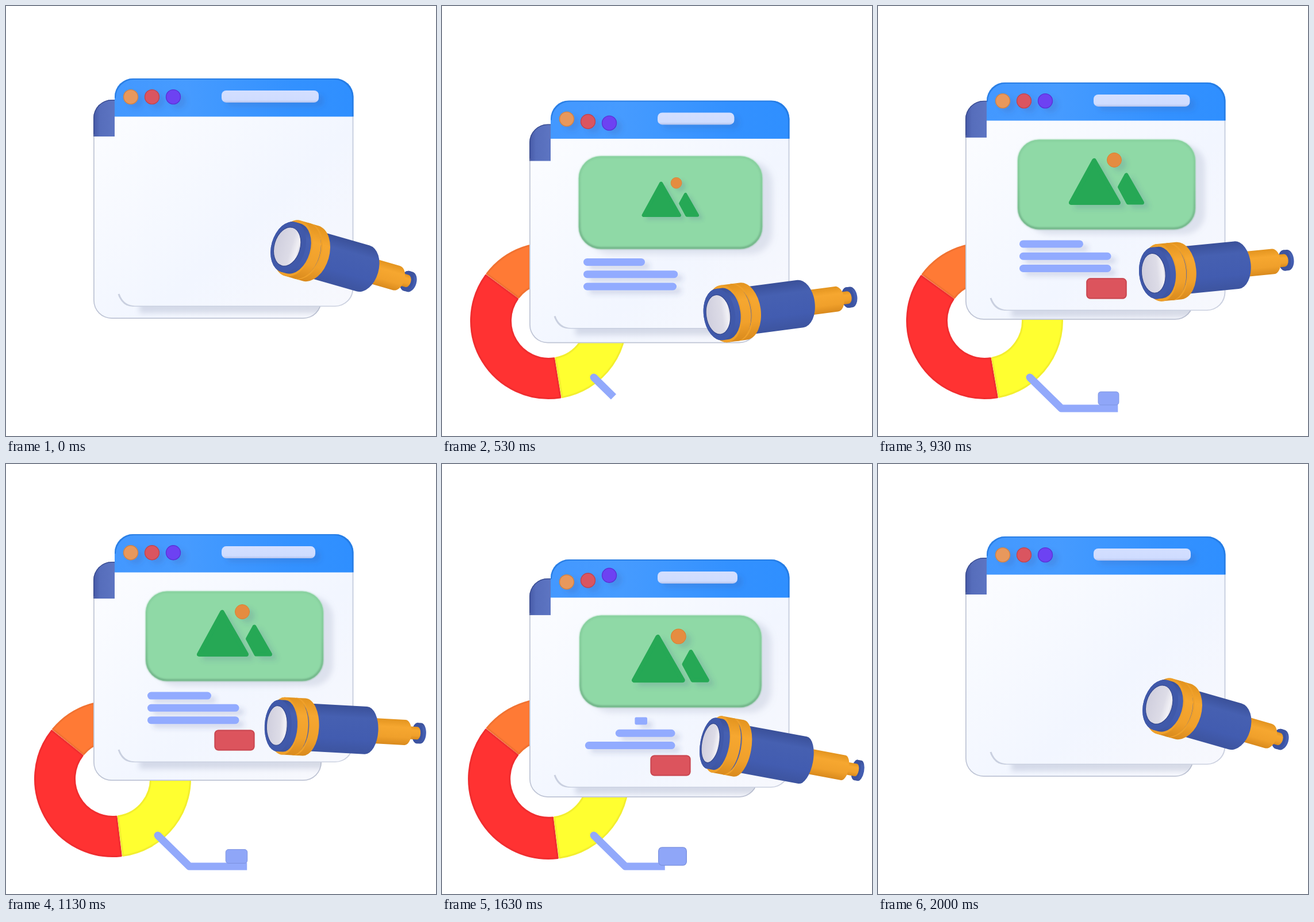
These frames come from a looping animation (748 px wide and 748 px high, 2030 ms). An HTML page:

```html
<!DOCTYPE html>
<html lang="en">
<head>
<meta charset="utf-8">
<title>Browser window and spyglass</title>
<style>
html, body { margin: 0; width: 100%; height: 100%; overflow: hidden; background: #fff; }
svg { display: block; width: 100vw; height: 100vh; }
</style>
</head>
<body>
<svg id="stage" viewBox="0 0 748 748" xmlns="http://www.w3.org/2000/svg">
  <defs>
    <linearGradient id="page" x1="0" y1="0" x2="1" y2="1">
      <stop offset="0" stop-color="#fcfdff"/><stop offset=".6" stop-color="#f2f6ff"/><stop offset="1" stop-color="#f7f8fd"/>
    </linearGradient>
    <linearGradient id="bar">
      <stop offset="0" stop-color="#4398ff"/><stop offset=".3" stop-color="#469bff"/><stop offset=".75" stop-color="#3391ff"/><stop offset="1" stop-color="#2f8fff"/>
    </linearGradient>
    <linearGradient id="backBar" x1="152" x2="190" gradientUnits="userSpaceOnUse">
      <stop offset="0" stop-color="#4659a6"/><stop offset=".3" stop-color="#566dbb"/><stop offset="1" stop-color="#5d75c2"/>
    </linearGradient>
    <linearGradient id="blue" x1="0" y1="0" x2="0" y2="1">
      <stop offset="0" stop-color="#3a5099"/><stop offset=".25" stop-color="#4660b1"/><stop offset=".7" stop-color="#425cb0"/><stop offset="1" stop-color="#3d549f"/>
    </linearGradient>
    <linearGradient id="gold" x1="0" y1="0" x2="0" y2="1">
      <stop offset="0" stop-color="#e3941f"/><stop offset=".3" stop-color="#f6a730"/><stop offset=".7" stop-color="#f0a02b"/><stop offset="1" stop-color="#d98a1d"/>
    </linearGradient>
    <linearGradient id="glass">
      <stop offset="0" stop-color="#cfcedd"/><stop offset=".65" stop-color="#dddce7"/><stop offset=".9" stop-color="#f2f1f6"/><stop offset="1" stop-color="#d5d4e0"/>
    </linearGradient>
    <linearGradient id="cardEdge" x1="0" y1="0" x2="0" y2="1">
      <stop offset="0" stop-color="#86cf9d"/><stop offset=".5" stop-color="#80c596"/><stop offset="1" stop-color="#6aa981"/>
    </linearGradient>
    <linearGradient id="pill" x1="0" y1="0" x2="0" y2="1">
      <stop offset="0" stop-color="#d3dfff"/><stop offset=".8" stop-color="#cfdcff"/><stop offset="1" stop-color="#b3c2ec"/>
    </linearGradient>
    <filter id="soft" x="-20%" y="-60%" width="140%" height="220%"><feGaussianBlur stdDeviation="5"/></filter>
    <filter id="bevel" x="-10%" y="-10%" width="120%" height="120%"><feGaussianBlur stdDeviation="1.5"/></filter>
    <filter id="bigShadow" x="-20%" y="-20%" width="150%" height="150%">
      <feDropShadow dx="17" dy="9" stdDeviation="5" flood-color="#7f88a8" flood-opacity=".2"/>
    </filter>
    <filter id="smallShadow" x="-40%" y="-60%" width="200%" height="300%">
      <feDropShadow dx="9" dy="7" stdDeviation="4" flood-color="#3d4f8f" flood-opacity=".16"/>
    </filter>
    <clipPath id="backClip"><rect x="152" width="397" height="381" rx="32"/></clipPath>
    <clipPath id="frontClip"><rect x="189" width="415.5" height="397" rx="32"/></clipPath>
  </defs>

  <g id="donut"></g>
  <g id="link" fill="#92a9fb">
    <path id="wire" d="M264 646L319 700H420" pathLength="1" fill="none" stroke="#92a9fb" stroke-width="13" stroke-linejoin="round"/>
    <circle cx="264" cy="646" r="6.5"/>
    <rect id="tag" x="-19.5" y="-12.5" width="39" height="25" rx="5" fill="#8fa6f8" stroke="#7c92df" stroke-width="1"/>
  </g>

  <g id="back">
    <g clip-path="url(#backClip)">
      <rect x="152" width="397" height="381" fill="url(#page)"/>
      <rect x="152" width="397" height="64" fill="url(#backBar)"/>
      <rect id="backShade" x="232" width="324" height="32" fill="#8e98b5" opacity=".3" filter="url(#soft)"/>
      <path d="M152 60V349a32 32 0 0 0 32 32H517a32 32 0 0 0 32-32" fill="none" stroke="#a9b0c4" stroke-width="3.5" opacity=".7"/>
      <path d="M152 64V32a32 32 0 0 1 32-32h10" fill="none" stroke="#364889" stroke-width="3" opacity=".8"/>
    </g>
  </g>

  <g id="front">
    <g clip-path="url(#frontClip)">
      <rect x="189" width="416" height="397" fill="url(#page)"/>
      <path d="M196 375Q203 396 224 397H572a32 32 0 0 0 32-32V66" fill="none" stroke="#b4bcd0" stroke-width="3" opacity=".65"/>
      <rect x="189" width="416" height="66.5" fill="url(#bar)"/>
      <path d="M189 34a34 34 0 0 1 34-34H570a34 34 0 0 1 34 34V66" fill="none" stroke="#2377dc" stroke-width="4" opacity=".75"/>
    </g>
    <g filter="url(#smallShadow)">
      <rect id="address" x="375" y="21" height="21" rx="8" fill="url(#pill)"/>
    </g>
    <g id="dots" filter="url(#smallShadow)"></g>
    <g id="card">
      <rect x="-154.5" y="-78" width="309" height="156" rx="37" fill="#8fd9a6" filter="url(#bigShadow)"/>
      <rect x="-153" y="-76.500" width="306" height="153" rx="35.500" fill="none" stroke="url(#cardEdge)" stroke-width="3" filter="url(#bevel)"/>
    </g>
    <g id="peaks" filter="url(#smallShadow)" fill="#25a855" stroke="#25a855" stroke-linejoin="round">
      <path d="M-21-34L-61 39H21Z" stroke-width="8"/>
      <path d="M35-9L23.500 12 38 39H62.500Z" stroke-width="7"/>
      <circle cx="14" cy="-35" r="12.500" fill="#e58c40" stroke="#d9812f" stroke-width="1"/>
    </g>
    <g id="lines" fill="#92abff" filter="url(#smallShadow)"></g>
    <g id="button">
      <rect x="-35" y="-18" width="70" height="36" rx="7" fill="#dc545d"/>
      <rect x="-34" y="-17" width="68" height="34" rx="6" fill="none" stroke="#c2434e" stroke-width="2" opacity=".7"/>
    </g>
  </g>

  <g id="scope"></g>
</svg>
<script>
const TAU = Math.PI * 2;
const LOOP = 2030, LENGTH = 2000, STEP = 100 / 3;
const $ = id => document.getElementById(id);
const clamp01 = v => Math.min(1, Math.max(0, v));
const place = (node, x, y, extra = '') => node.setAttribute('transform', `translate(${x} ${y}) ${extra}`);

function add(parent, name, attrs) {
  const node = document.createElementNS('http://www.w3.org/2000/svg', name);
  set(node, attrs);
  return parent.appendChild(node);
}
function set(node, attrs) {
  for (const key in attrs) node.setAttribute(key, attrs[key]);
}

// Monotone cubic curve through [time, value] pairs.
function track(t, keys) {
  const last = keys.length - 1;
  if (t <= keys[0][0]) return keys[0][1];
  if (t >= keys[last][0]) return keys[last][1];
  const slope = i => (keys[i + 1][1] - keys[i][1]) / (keys[i + 1][0] - keys[i][0]);
  const tangent = i => {
    if (i === 0 || i === last) return 0;
    const a = slope(i - 1), b = slope(i);
    return a * b > 0 ? 2 * a * b / (a + b) : 0;
  };
  let i = 0;
  while (t > keys[i + 1][0]) i++;
  const span = keys[i + 1][0] - keys[i][0], u = (t - keys[i][0]) / span;
  const ease = u * u * (3 - 2 * u);
  return keys[i][1] * (1 - ease) + keys[i + 1][1] * ease
    + span * u * (1 - u) * ((1 - u) * tangent(i) - u * tangent(i + 1));
}

// Scale that springs in at `start` and pulls back before vanishing at `end`.
function pop(t, start, end, duration = 350) {
  const u = t < end ? 1 - clamp01((t - start) / duration) : clamp01((t - end) / duration);
  return 1 - (3.1 * u ** 3 - 2.1 * u ** 2);
}

const wave = (t, mid, amp, delay = 0) => mid - amp * Math.cos(TAU * (t - delay) / 1000);

// Donut
function sector(from, to, inner, outer) {
  const at = (deg, r) => {
    const a = deg * TAU / 360;
    return `${(r * Math.sin(a)).toFixed(2)} ${(-r * Math.cos(a)).toFixed(2)}`;
  };
  return `M${at(from + .7, outer)}A${outer} ${outer} 0 0 1 ${at(to - .7, outer)}`
    + `L${at(to - 1.3, inner)}A${inner} ${inner} 0 0 0 ${at(from + 1.3, inner)}Z`;
}
[[0, 136, '#ff3232', '#f02d2f'], [136, 269, '#ff7a35', '#f17231'], [269, 360, '#ffff30', '#f3ef2e']]
  .forEach(([from, to, fill, stroke]) => add($('donut'), 'path',
    { d: sector(from, to, 66, 135), fill, stroke, 'stroke-width': 3, 'stroke-linejoin': 'round' }));

// Window controls and text lines
const dots = [['#e8985b', '#cf8247', 217], ['#da5560', '#c0444f', 254], ['#6d42f2', '#5a33d6', 291]]
  .map(([fill, stroke, cx]) => add($('dots'), 'circle', { cx, r: 12.5, fill, stroke, 'stroke-width': 1.4 }));
const lineLengths = [111, 159.5, 159.5];
const lines = lineLengths.map((_, i) => add($('lines'), 'rect', { y: 274.5 + i * 21.3, height: 13 }));

function hop(t, start) {
  const u = (t - start) / 333.3;
  return u > 0 && u < 1 ? -7.4 * Math.sin(TAU * u) : 0;
}
const lineGrow = [[0, 0], [8, .12], [41, .736], [75, 1.135], [135, .95], [208, 1.016], [241, 1.03], [275, .964], [400, 1]];

// Spyglass parts, far to near: axial start, end, radius, paint
const AXIS_MID = 144;
const tubes = [
  [280, 287, 18, 'url(#blue)', '#3c53a0'],
  [255, 280, 11, 'url(#gold)'],
  [175, 255, 22, 'url(#gold)'],
  [40, 175, 41.5, 'url(#blue)'],
  [31, 49, 50, 'url(#gold)', '#efa02a'],
  [24, 31, 46, 'url(#blue)'],
  [7, 27, 50, 'url(#gold)', '#efa02a'],
  [-4, 8, 45, 'url(#blue)', '#4059aa']
].map(([from, to, r, fill, cap]) => ({
  from, to, r,
  side: add($('scope'), 'path', { fill }),
  cap: cap && add($('scope'), 'ellipse', { fill: cap })
}));
const lens = add($('scope'), 'ellipse', { fill: 'url(#glass)', stroke: '#36498f', 'stroke-width': 1.2 });

function drawScope(t) {
  const tilt = track(t, [[0, 16], [333, 13], [533, -7.5], [933, -5.6], [1333, 10.9], [1633, 10.5], [2000, 16]]);
  const yaw = track(t, [[0, 41], [333, 41], [533, 37.5], [933, 37], [1333, 26], [1633, 26], [2000, 41]]) * TAU / 360;
  const along = Math.cos(yaw), k = Math.sin(yaw);
  const ax = v => (v - AXIS_MID) * along;
  place($('scope'), 598.5 + 10 * (along - .755), wave(t, 486, 36), `rotate(${tilt})`);
  for (const { from, to, r, side, cap } of tubes) {
    const a = ax(from), b = ax(to), arc = `A${k * r} ${r} 0 0 1 `;
    side.setAttribute('d', `M${a} ${-r}L${b} ${-r}${arc}${b} ${r}L${a} ${r}${arc}${a} ${-r}Z`);
    if (cap) set(cap, { cx: a, rx: k * r, ry: r });
  }
  set(lens, { cx: ax(-4) - 2, rx: k * 34.5, ry: 34.5 });
}

function draw(t) {
  const back = wave(t, 184.5, 21.5), front = wave(t, 144, 22.4, 101);
  place($('back'), 0, back);
  place($('front'), 0, front);
  $('backShade').setAttribute('y', front + 376 - back);

  const spin = track(t, [[17, 290], [333, 198], [533, 170.6], [933, 170], [1333, 176], [1633, 172.8], [1940, 90]]);
  place($('donut'), 185.5, 547.5, `rotate(${spin}) scale(${pop(t, 17, 1588)})`);

  const drawn = track(t, [[450, 0], [533, .27], [760, .95], [933, .985], [1333, 1], [1550, 1], [1633, .82], [1850, 0]]);
  $('wire').setAttribute('stroke-dasharray', `${drawn} 2`);
  $('link').setAttribute('visibility', drawn > 0 ? 'visible' : 'hidden');
  place($('tag'), 401, 682.5, `scale(${track(t, [[733, 0], [933, .92], [1333, 1], [1633, 1.25], [1850, 0]])})`);

  $('address').setAttribute('width', 151 + 18 * Math.cos(TAU * t / 1000));
  dots.forEach((dot, i) =>
    dot.setAttribute('cy', 32.2 + hop(t, 166.7 + i * 66.7) + hop(t, 1366.7 + i * 66.7)));

  place($('card'), 397.5, 177.5, `scale(${pop(t, 233, 1592)})`);
  place($('peaks'), 397, 170, `scale(${pop(t, 463, 1588)})`);
  place($('button'), 397.5, 358.5, `scale(${pop(t, 600, 1633)})`);

  lines.forEach((line, i) => {
    const grown = lineLengths[i] * track(t - 258 - i * 33.5, lineGrow);
    const width = grown * track(t - 1558 - i * 33.5, [[0, 1], [105, 0]]);
    set(line, { x: 246 + grown - width, width, rx: Math.min(6.5, width / 9) });
  });

  drawScope(t);
}

function frame(now) {
  const t = now % LOOP;
  draw(Math.min(LENGTH, Math.floor((t + 4) / STEP) * STEP));
  requestAnimationFrame(frame);
}
draw(0);
requestAnimationFrame(frame);
</script>
</body>
</html>
```
